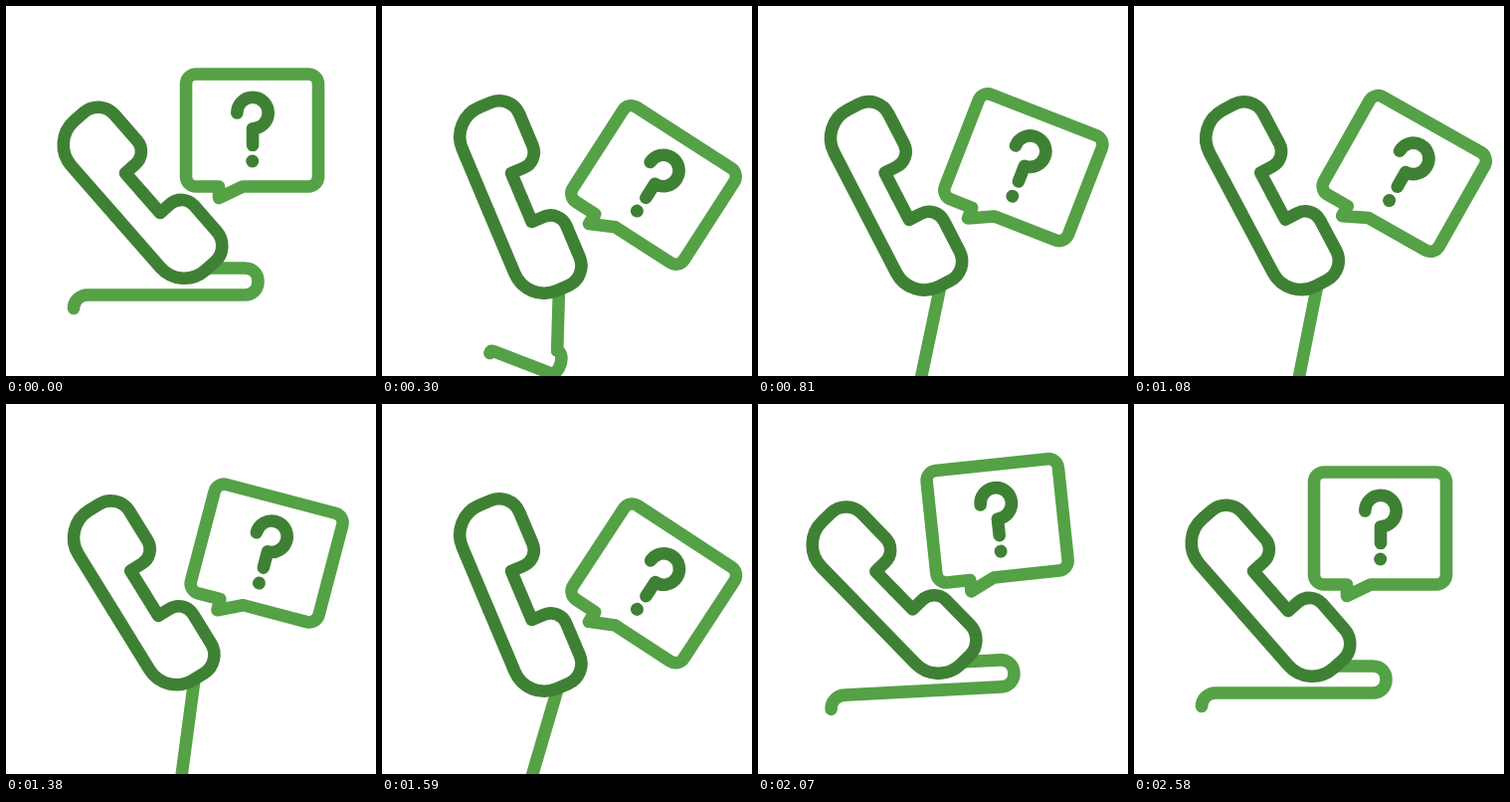
Recreate the animation shown at these times as an HTML page. Size 372 px wide and 372 px high, loop 3.6 s.

```html
<!DOCTYPE html>
<html lang="en">
<head>
<meta charset="utf-8">
<title>Phone question</title>
<style>
  html, body { margin: 0; width: 100%; height: 100%; overflow: hidden; background: #fff; }
  svg { display: block; width: 100%; height: 100%; }
  path { fill: none; stroke-width: 12.6; stroke-linecap: round; stroke-linejoin: round; }
  .light { stroke: #54a146; }
  .dark { stroke: #3f8134; }
  circle { fill: #3f8134; }
</style>
</head>
<body>
<svg viewBox="0 0 372 372">
  <g id="call">
    <path id="cord" class="light"/>
    <g id="bubble">
      <path class="light" d="M191 181.5H214V193L238 181.5H304a10 10 0 0 0 10 -10V78.5a10 10 0 0 0 -10 -10H191a10 10 0 0 0 -10 10V171.5a10 10 0 0 0 10 10Z"/>
      <path class="dark" d="M232.3 107.5a15.7 15.7 0 1 1 15.7 15.7V140"/>
      <circle cx="247.7" cy="156" r="6.5"/>
    </g>
    <!-- half a handset along its own axis, then mirrored -->
    <g transform="matrix(.659 .752 .752 -.659 137.5 188)">
      <path id="half" class="dark" d="M0 0H26.6V13.5a17 17 0 0 0 17 17H78a22 22 0 0 0 22 -22V-4a32 32 0 0 0 -32 -32H0"/>
      <use href="#half" transform="scale(-1 1)"/>
    </g>
  </g>
</svg>
<script>
const LOOP = 3600, STEP = 30;
const PERIOD = 640, LAND = 2070, REST = 2580;
const [call, bubble, cord] = ['call', 'bubble', 'cord'].map(id => document.getElementById(id));

const mix = (a, b, k) => a + (b - a) * k;

function ease(t, from, to) {
  const f = Math.min(1, Math.max(0, (t - from) / (to - from)));
  return f * f * (3 - 2 * f);
}

// rise to a peak, rock twice, drop past zero, settle
function rock(t, { peak, drop, high, low }) {
  const under = -3;
  if (t >= LAND) return under * (1 - ease(t, LAND, REST));
  if (t >= drop) return mix(high, under, ease(t, drop, LAND));
  if (t < peak) return high * ease(t, 0, peak);
  const cycles = Math.min(2, (t - peak) / PERIOD);
  return mix(low, high, (1 + Math.cos(2 * Math.PI * cycles)) / 2);
}

const handset = { peak: 300, drop: 1580, high: 18.4, low: 5.6 };
const speech = { peak: 395, drop: 1780, high: 16.8, low: 5 };

// key points of the cord, lying down and pulled straight
const slack = [[204, 263.5], [240, 263.5], [240, 290.5], [82, 290.5], [68, 304]];
const taut = [[201.5, 265.4], [205, 368], [206, 389], [220, 384], [224, 379]];

function cordPath(k) {
  const [a, b, c, d, e] = slack.map((p, i) => p.map((v, j) => mix(v, taut[i][j], k)));
  const bend = mix(18, 3, k), hook = mix(7.6, 0, k);
  return `M${a}L${b}C${b[0] + bend} ${b[1]} ${c[0] + bend} ${c[1]} ${c}` +
    `L${d}C${d[0] - hook} ${d[1]} ${e[0]} ${e[1] - hook} ${e}`;
}

function draw(ms) {
  const t = Math.floor(ms % LOOP / STEP) * STEP;
  const pull = ease(t, 0, 550) - ease(t, 1630, LAND);
  call.setAttribute('transform', `rotate(${rock(t, handset)} 125 199)`);
  bubble.setAttribute('transform', `rotate(${rock(t, speech)} 217 177)`);
  cord.setAttribute('d', cordPath(pull));
}

const start = performance.now();
function tick(now) {
  draw(Math.max(0, now - start));
  requestAnimationFrame(tick);
}
draw(0);
requestAnimationFrame(tick);
</script>
</body>
</html>
```
